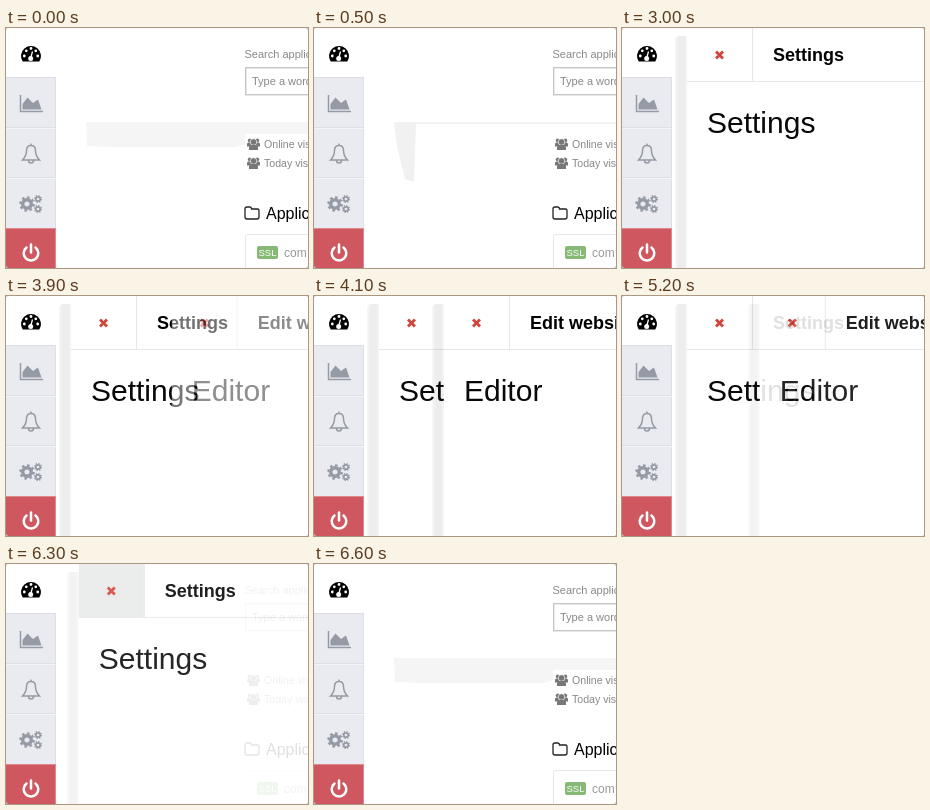
An HTML page that plays this animation: 302x240 px, repeating every 6900 ms.

```html
<!DOCTYPE html>
<html lang="en">
<head>
<meta charset="utf-8">
<title>Stacked panels</title>
<style>
  html, body { margin: 0; height: 100%; overflow: hidden; background: #bbb; }
  svg { display: block; width: 100%; height: 100%; font-family: "Liberation Sans", Arial, sans-serif; }
  .line { fill: none; stroke: #e7e7e7; }
  .small { font-size: 11px; fill: #888; }
  .visits { font-size: 10.6px; fill: #888; }
  .icon { fill: none; stroke: #959aa4; }
  .title { font-size: 18px; font-weight: bold; }
  .heading { font-size: 30px; fill: #080808; }
</style>
</head>
<body>
<svg viewBox="0 0 302 240">
  <defs>
    <clipPath id="window"><rect width="302" height="240" rx="3"/></clipPath>
    <linearGradient id="edge">
      <stop offset="0" stop-opacity=".03"/>
      <stop offset=".3" stop-opacity=".07"/>
      <stop offset=".8" stop-opacity=".07"/>
      <stop offset="1" stop-opacity=".03"/>
    </linearGradient>
    <g id="users" fill="#777">
      <circle cx="2.8" cy="2.6" r="2"/><circle cx="10.2" cy="2.6" r="2"/>
      <path d="M0 8.5V6q0-1.5 1.5-1.5h10Q13 4.5 13 6v2.5z"/>
      <circle cx="6.5" cy="4" r="3.3" stroke="#fff" stroke-width=".7"/>
      <path d="M2 12V10q0-3 2.5-3h4q2.5 0 2.5 3v2z"/>
    </g>
    <g id="gear" class="icon">
      <circle r="4.3" stroke-width="3.4"/>
      <circle r="6.6" stroke-width="2.4" pathLength="16" stroke-dasharray="1"/>
    </g>
  </defs>

  <g clip-path="url(#window)">
    <rect width="302" height="240" fill="#fff"/>

    <g id="home">
      <path id="band" fill="#f5f5f5" d="M80 94H302V106H239V116L230 119H106L81 118z"/>
      <path id="wedge" fill="#f1f1f1" d="M80 94H302V96H102L100 154L91 151L83 118z"/>
      <text class="small" x="238.5" y="30">Search applications</text>
      <rect x="239.7" y="39.7" width="80" height="27" fill="#fff" stroke="#c6c6c6" stroke-width="1.4"/>
      <text class="small" x="246" y="57">Type a word</text>
      <use href="#users" x="241" y="110"/>
      <text class="visits" x="258" y="120">Online visitors</text>
      <use href="#users" x="241" y="129"/>
      <text class="visits" x="258" y="139">Today visitors</text>
      <path d="M239 181q0-2 2-2h3q1.5 0 1.5 2h6q1.5 0 1.5 1.5v6.5q0 2-2 2h-10q-2 0-2-2z" fill="none" stroke="#222" stroke-width="1.3"/>
      <text x="260" y="191" font-size="16">Applications</text>
      <rect class="line" x="239.5" y="206.5" width="80" height="50" rx="2"/>
      <rect x="251" y="218" width="21" height="13" rx="2" fill="#86b975"/>
      <text x="261.5" y="228" font-size="9.5" fill="#fff" text-anchor="middle">SSL</text>
      <text x="278" y="228.5" font-size="12" fill="#999">com</text>
    </g>

    <g id="settings"></g>
    <g id="editor"></g>

    <g id="sidebar">
      <rect width="50" height="50" fill="#fff"/>
      <rect y="49" width="50" height="152" fill="#e9ebf1"/>
      <path d="M0 49.5H50M0 99.5H50M0 149.5H50M49.5 50V200" stroke="#dcdfe6"/>
      <path d="M0 100.5H50M0 150.5H50" stroke="#f3f4f8"/>
      <rect y="200" width="50" height="40" fill="#cf575f"/>
      <path d="M0 200.5H49.5V240" fill="none" stroke="#fff" opacity=".3"/>

      <path d="M16.7 33.5A10 10 0 1 1 33.3 33.5z"/>
      <g fill="#fff">
        <circle cx="18.3" cy="28" r="1.4"/><circle cx="20.3" cy="22.8" r="1.4"/>
        <circle cx="25" cy="20.5" r="1.4"/><circle cx="29.8" cy="22.8" r="1.4"/>
        <circle cx="31.7" cy="28" r="1.4"/><circle cx="24.7" cy="30.5" r="2.5"/>
        <path d="M24.7 30L26.5 23.5" stroke="#fff" stroke-width="1.3"/>
      </g>

      <path class="icon" d="M14.5 67V83.5H37" stroke-width="1.5"/>
      <path d="M16.5 81.5V76L21.5 69.5L27 75L32 71.5L35.5 81.5z" fill="#959aa4"/>

      <path class="icon" stroke-width="1.5" d="M16.5 132q4-4 4-9.5q0-5 4.5-5t4.5 5q0 5.5 4 9.5zM25 117.5v-2M22.5 132.5a2.5 2.5 0 0 0 5 0"/>

      <use href="#gear" x="21" y="176"/>
      <use href="#gear" transform="translate(32 171) scale(.52)"/>
      <use href="#gear" transform="translate(32 181) scale(.52)"/>

      <path d="M20.5 219.5a7.3 7.3 0 1 0 9 0M25 216.5v8" fill="none" stroke="#fff" stroke-width="2.5" stroke-linecap="round"/>
    </g>
  </g>
</svg>

<script>
const LOOP = 6900, STEP = 100, SHIFT = 65;
const OPENING = [.45, .88, 1], CLOSING = [.88, .45, .08, 0];
const $ = selector => document.querySelector(selector);
const fade = (selector, opacity) => $(selector).setAttribute('opacity', opacity);
const clamp = x => Math.max(0, Math.min(1, x));

function build(id, title, heading) {
  $(id).innerHTML = `
    <path class="shadow" d="M-12 12Q-12 8-7 8H0V240H-12z" fill="url(#edge)"/>
    <rect width="302" height="240" fill="#fff"/>
    <rect class="hover" width="65" height="53" fill="#e9ebea" opacity="0"/>
    <path class="line" d="M65.5 0V53M0 53.5H302"/>
    <path d="M29 23.5l7 7m0-7l-7 7" stroke="#d2453a" stroke-width="2.8"/>
    <text class="title" x="86" y="33">${title}</text>
    <text class="heading" x="20" y="105">${heading}</text>`;
}

// How far a panel is in place, 0 to 1
function presence(t, open, close) {
  if (t < open) return 0;
  const [list, start] = t < close ? [OPENING, open] : [CLOSING, close];
  return list[Math.min((t - start) / STEP, list.length - 1)];
}

function place(id, left, p) {
  $(id).setAttribute('transform', `translate(${left + SHIFT * (1 - p)} 0)`);
  fade(id, p);
  fade(id + ' .shadow', clamp(2 * p - 1));
}

function draw(now) {
  const t = Math.floor(now % LOOP / STEP) * STEP;
  place('#settings', 65, presence(t, 2500, 6300));
  place('#editor', 130, presence(t, 3900, 5200));
  fade('#settings .hover', clamp((t - 5700) / 300));
  fade('#band', +(t < 200 || t >= 6600));
  fade('#wedge', +(t >= 200 && t < 2700));
  requestAnimationFrame(draw);
}

build('#settings', 'Settings', 'Settings');
build('#editor', 'Edit website', 'Editor');
requestAnimationFrame(draw);
</script>
</body>
</html>
```
